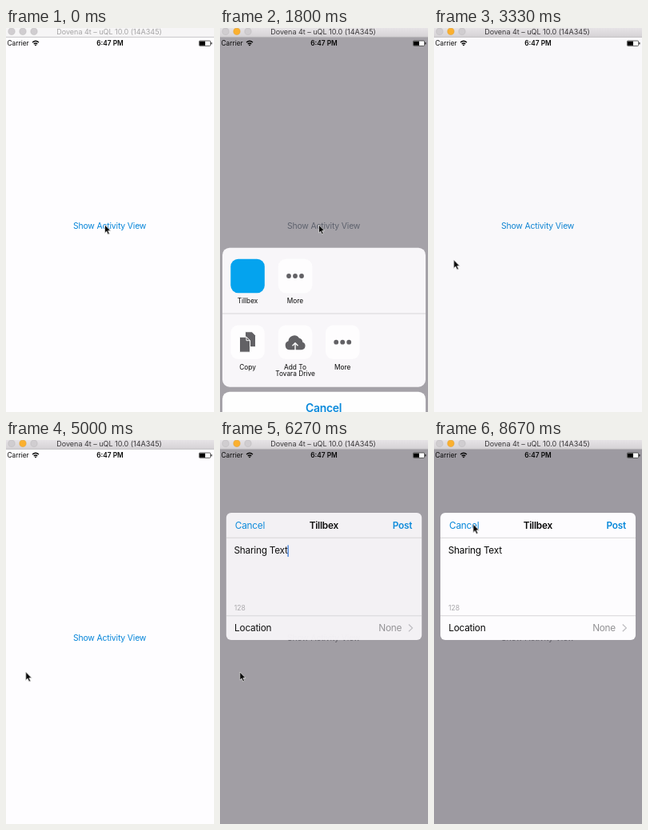
Recreate the animation shown at these times as an HTML page. Size 260 by 480 pixels, loop 8.74 s.

```html
<!DOCTYPE html>
<html lang="en">
<head>
<meta charset="utf-8">
<title>Share sheet</title>
<style>
  html, body { margin: 0; width: 100%; height: 100%; overflow: hidden; background: #fefdfe; }
  svg { display: block; width: 260px; height: 480px; }
  text { font-family: Inter, Roboto, sans-serif; fill: #080808; white-space: pre; }
  .mid { text-anchor: middle; }
  .bold { font-weight: 600; }
  .blue { fill: #0788da; }
  .small { font-size: 8.3px; }
  .body { font-size: 11.8px; letter-spacing: -.02em; }
  .line { stroke: #c9c8cb; stroke-width: .7; }
  .tile { fill: #fefdfe; }
  .glyph { fill: #626165; }
  #cursor { filter: drop-shadow(0 .6px .7px rgba(0, 0, 0, .4)); }
</style>
</head>
<body>
<svg viewBox="0 0 260 480">
  <defs>
    <linearGradient id="chrome" x2="0" y2="1">
      <stop stop-color="#e6e3e6"/><stop offset="1" stop-color="#d5d2d5"/>
    </linearGradient>
    <g id="dots" class="glyph">
      <circle cx="-8" r="2.9"/><circle r="2.9"/><circle cx="8" r="2.9"/>
    </g>
    <rect id="tile" width="42.5" height="42.5" rx="9.5"/>
    <path id="page" d="M0 0H8.5L13 4.5V19H0Z"/>
  </defs>

  <rect width="260" height="480" fill="#fefdff"/>
  <text id="button" class="mid" x="129.6" y="250.7" font-size="10.4" letter-spacing="-.16">Show Activity View</text>
  <rect id="dim" y="11" width="260" height="469" fill="#0c0614"/>

  <g id="status">
    <text class="small" x="1.5" y="22">Carrier</text>
    <g fill="none" stroke="#080808" stroke-width="1.3">
      <path d="M33 18.1Q37 14.5 41 18.1M34.7 20Q37 18 39.3 20"/>
    </g>
    <path d="M35.6 21.1Q37 20 38.4 21.1L37 22.6Z"/>
    <text class="small bold mid" x="130" y="22">6:47 PM</text>
    <rect x="241.4" y="16" width="14.2" height="6.4" rx="1" fill="#fefefe" stroke="#222" stroke-width=".7"/>
    <rect x="242" y="16.6" width="7" height="5.2"/>
    <rect x="256.4" y="18" width="1" height="2.4"/>
  </g>

  <g id="sheet">
    <rect x="3" y="256" width="254" height="174" rx="9" fill="#f8f6f9"/>
    <path class="line" d="M3 338.3H257"/>
    <use href="#tile" x="13.3" y="270" fill="#04a3ee"/>
    <g class="tile">
      <use href="#tile" x="72.8" y="270"/>
      <use href="#tile" x="13.3" y="352.7"/>
      <use href="#tile" x="72.8" y="352.7"/>
      <use href="#tile" x="132" y="352.7"/>
    </g>
    <use href="#dots" x="94" y="291.3"/>
    <use href="#dots" x="153.2" y="374"/>
    <g class="glyph" stroke="#fefefe" stroke-width="1">
      <use href="#page" x="31.5" y="361"/>
      <use href="#page" x="24.5" y="367.5"/>
      <path d="M33 367.5V372H37.5" fill="none"/>
    </g>
    <path class="glyph" d="M87 383.5A5.6 5.6 0 0 1 85.5 372.6A7.3 7.3 0 0 1 98.8 368.8A6 6 0 0 1 103.3 374A4.9 4.9 0 0 1 102 383.5Z"/>
    <path d="M94 385V375.5M90.5 378.5L94 375L97.5 378.5" fill="none" stroke="#fefefe" stroke-width="1.4"/>
    <g class="small">
      <text class="mid" x="34.5" y="325">Tillbex</text>
      <text class="mid" x="94" y="325">More</text>
      <text class="mid" x="34.5" y="408">Copy</text>
      <text class="mid" x="94" y="408">Add To</text>
      <text class="mid" x="94" y="416.7">Tovara Drive</text>
      <text class="mid" x="153.2" y="408">More</text>
    </g>
    <rect x="3" y="436" width="254" height="40" rx="9" fill="#fefefe"/>
    <text class="mid bold blue" x="129.6" y="461" font-size="13.9" letter-spacing="-.25">Cancel</text>
  </g>

  <g id="card">
    <rect id="cardBg" x="8" y="91" width="244" height="159" rx="6"/>
    <g id="cardBody" class="body">
      <path class="line" d="M8 122.3H252M8 219.7H252"/>
      <text class="blue" x="19" y="110.8">Cancel</text>
      <text class="bold mid" x="129.8" y="110.8">Tillbex</text>
      <text class="bold blue" x="240" y="110.8" text-anchor="end">Post</text>
      <text x="17.7" y="142.4">Sharing Text</text>
      <rect id="caret" x="84.5" y="131.5" width="1.4" height="14.5" fill="#3f7fdc"/>
      <text x="18" y="212.6" font-size="8.6" letter-spacing="0" style="fill:#a9a8ab">128</text>
      <text x="18.3" y="239.2">Location</text>
      <text x="227" y="239.2" text-anchor="end" style="fill:#929194">None</text>
      <path d="M235.8 230.5L240.3 234.9L235.8 239.3" fill="none" stroke="#bfbec2" stroke-width="1.3"/>
    </g>
  </g>

  <g id="bar">
    <rect id="barBg" width="260" height="11.5"/>
    <path d="M0 11.4H260" stroke="#b5b3b5" stroke-width=".7"/>
    <g fill="#d0cdd0" stroke="#bcbabc" stroke-width=".6">
      <circle cx="7" cy="4.3" r="4.1"/>
      <circle id="light" cx="21" cy="4.3" r="4.1"/>
      <circle cx="35" cy="4.3" r="4.1"/>
    </g>
    <text id="title" class="mid" x="129" y="7.5" font-size="9">Dovena 4t – uQL 10.0 (14A345)</text>
  </g>

  <path id="cursor" d="M0 0V10.2L2.3 8.1L4 12L5.8 11.2L4.1 7.5H7.2Z" fill="#080808" stroke="#fff" stroke-width=".7"/>
</svg>
<script>
const LOOP = 8740, STEP = 200 / 3, LAST = 130;
const $ = id => document.getElementById(id);
const set = (id, attrs) => {
  for (const k in attrs) $(id).setAttribute(k, attrs[k]);
};

const clamp = x => Math.min(1, Math.max(0, x));
const mix = (a, b, p) => a + (b - a) * p;
const ramp = (t, a, b) => clamp((t - a) / (b - a));
const smooth = p => p * p * (3 - 2 * p);
const blend = (from, to, p) => `rgb(${from.map((c, i) => Math.round(mix(c, to[i], p)))})`;

// Critically damped approach from 0 to 1
const spring = (t, start, rate) => {
  const x = Math.max(0, t - start) * rate;
  return 1 - (1 + x) * Math.exp(-x);
};

const BLUE = [6, 133, 217], GRAY = [153, 152, 156];
const HAZE = [239, 236, 239], WHITE = [253, 252, 254];

// Start, end, from point, to point
const MOVES = [
  [2000, 2600, [123.5, 246], [24.8, 290]],
  [6740, 7670, [24.8, 290], [49, 105.3]]
];

function cursorAt(t) {
  let pos = MOVES[0][2];
  for (const [a, b, from, to] of MOVES) {
    if (t < a) break;
    const p = smooth(ramp(t, a, b));
    pos = from.map((v, i) => mix(v, to[i], p));
  }
  return pos;
}

// The caret rests for the second half of each period
const BLINK = 1066;
const caretOn = t => t < 6500 || (t - 6500) % BLINK > BLINK / 2;

function draw(t) {
  const active = t > 60;
  set('barBg', { fill: active ? 'url(#chrome)' : '#f6f5f6' });
  set('light', { fill: active ? '#fbb02f' : '#d0cdd0', stroke: active ? '#dfa030' : '#bcbabc' });
  $('title').style.fill = active ? '#383638' : '#a5a4a5';

  // Share sheet
  const rise = t < 3000 ? spring(t, 1520, .015) : 1 - spring(t, 3000, .014);
  const sheetOn = t > 1520 && t < 4070;
  set('sheet', {
    transform: `translate(0 ${240 * (1 - rise)})`,
    visibility: sheetOn ? 'visible' : 'hidden'
  });

  // Compose card
  const fade = t > 5870 ? 1 - Math.exp(-.0083 * (t - 5870)) : 0;
  const settle = spring(t, 5890, .0185);
  const scale = mix(1.2, 1, settle);
  set('card', {
    transform: `translate(130 170.5) scale(${scale}) translate(-130 -170.5)`,
    visibility: fade ? 'visible' : 'hidden'
  });
  set('cardBg', { fill: blend(HAZE, WHITE, ramp(t, 5930, 6600)), 'fill-opacity': fade });
  set('cardBody', { opacity: fade });
  set('caret', { opacity: caretOn(t) ? 1 : 0 });

  const shade = sheetOn ? rise : fade;
  set('dim', { 'fill-opacity': .4 * shade });
  $('button').style.fill = blend(BLUE, GRAY, sheetOn ? rise : settle);
  const pressed = t > 1390 && t < 1600;
  set('button', { opacity: pressed ? mix(.35, 1, smooth(ramp(t, 1450, 1600))) : 1 });

  set('cursor', { transform: `translate(${cursorAt(t)})` });
}

function tick(now) {
  const frame = Math.min(LAST, Math.floor((now % LOOP + 4) / STEP));
  draw(frame * STEP);
  requestAnimationFrame(tick);
}
draw(0);
requestAnimationFrame(tick);
</script>
</body>
</html>
```
